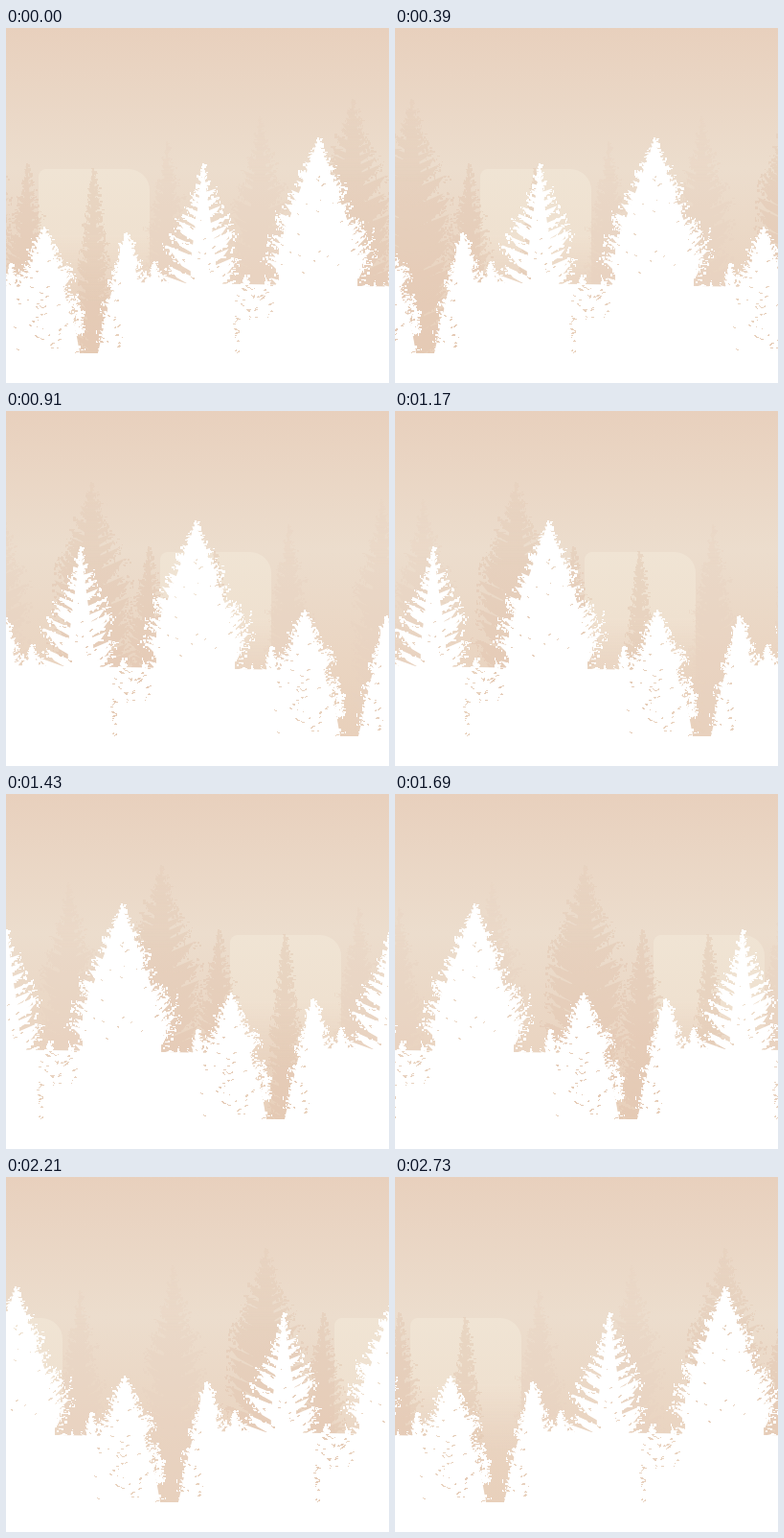
An HTML page with a canvas that plays this animation: 400x370 px, repeating every 2.86 s.

```html
<!DOCTYPE html>
<html lang="en">
<head>
<meta charset="utf-8">
<title>Forest</title>
<style>
html, body { margin: 0; width: 100%; height: 100%; overflow: hidden; background: #fff; }
canvas { display: block; }
</style>
</head>
<body>
<canvas id="stage" width="400" height="370"></canvas>
<script>
const W = 400, H = 370, GROUND = 339, STEP = 130, STEPS = 22;
const ctx = document.getElementById('stage').getContext('2d');

let seed = 7;
function rnd() {
  seed = (seed * 16807) % 2147483647;
  return seed / 2147483647;
}
const between = (a, b) => a + (b - a) * rnd();

function makeTile(paint) {
  const c = document.createElement('canvas');
  c.width = W;
  c.height = H;
  const g = c.getContext('2d');
  g.beginPath();
  g.rect(0, 0, W, GROUND);
  g.clip();
  paint(g);
  return c;
}

// Shapes repeat sideways so that each tile is seamless.
function poly(g, pts) {
  for (const dx of [-W, 0, W]) {
    g.beginPath();
    pts.forEach(([x, y]) => g.lineTo(x + dx, y));
    g.fill();
  }
}

function dab(g, x, y, w, h) {
  for (const dx of [-W, 0, W]) g.fillRect(Math.round(x) + dx, Math.round(y), w, h);
}

const grain = () => 1 + Math.floor(rnd() * 2.6);

// A bough rises outward from the trunk, with loose needles around it.
function bough(g, x, y, side, reach) {
  const drop = Math.min(20, reach * 0.5), t = 1.5 + reach * 0.06;
  poly(g, [[x, y + drop - t], [x + side * reach * 0.92, y],
    [x + side * reach * 0.7, y + drop * 0.4 + t], [x, y + drop + t * 2]]);
  for (let i = 0; i < 3 + reach * 0.55; i++) {
    const u = between(0.25, 1.05);
    dab(g, x + side * reach * u, y + drop * (1 - u) + between(-3, 5), grain(), grain());
  }
}

// The crown widens to w over the height h, then drops straight to the ground.
function tree(g, { x, y, h, w, bend = 1, core = 0.5, gap = 5, base = GROUND }) {
  const reach = d => 1 + w * Math.min(1, d / h) ** bend;
  const edge = [];
  for (let d = 0; d <= base - y; d += 8) {
    const r = reach(d) * core;
    edge.unshift([x - r, y + d + 5]);
    edge.push([x + r, y + d + 5]);
  }
  poly(g, edge);
  dab(g, x - 1, y, 2, 9);
  for (const side of [-1, 1]) {
    for (let d = 3; d < base - y; d += gap * between(0.6, 1.4)) {
      bough(g, x, y + d, side, reach(d) * between(0.7, 1.1));
    }
  }
}

// Short slanted slits cut through the snow.
function slits(g, x, y, rx, ry, n) {
  g.globalCompositeOperation = 'destination-out';
  for (let i = 0; i < n; i++) {
    const px = x + between(-rx, rx), py = y + between(-ry, ry);
    const lean = px < x ? 1 : -1;
    for (let k = 0; k < grain(); k++) dab(g, px + k * lean, py + k, grain(), 1);
  }
  g.globalCompositeOperation = 'source-over';
}

const front = makeTile(g => {
  g.fillStyle = '#fff';
  poly(g, [[96, GROUND], [110, 276], [130, 265], [425, 270], [470, 300], [477, GROUND]]);
  tree(g, { x: 326, y: 114, h: 110, w: 56, core: 0.72 });
  tree(g, { x: 206, y: 141, h: 97, w: 43, core: 0.3, gap: 8 });
  tree(g, { x: 126, y: 213, h: 100, w: 28, bend: 0.6, core: 0.6 });
  tree(g, { x: 40, y: 207, h: 70, w: 37, bend: 0.8, core: 0.6 });
  for (const [x, y, w] of [[155, 243, 14], [76, 289, 6], [250, 257, 13], [272, 262, 10], [405, 245, 11]]) {
    tree(g, { x, y, h: 24, w, base: y + 26, gap: 4 });
  }
  slits(g, 326, 200, 42, 55, 30);
  slits(g, 206, 220, 28, 40, 24);
  slits(g, 40, 285, 38, 52, 65);
  slits(g, 258, 285, 20, 18, 36);
  slits(g, 239, 318, 4, 18, 14);
  slits(g, 108, 300, 14, 36, 20);
});

const woods = makeTile(g => {
  const grow = (color, spec) => {
    g.fillStyle = color;
    tree(g, { core: 0.3, gap: 6, ...spec });
  };
  const pale = '#e8d2c0', deep = '#dfc2ab';
  grow(pale, { x: 168, y: 118, h: 110, w: 28 });
  grow(pale, { x: 265, y: 92, h: 90, w: 30 });
  grow(deep, { x: 362, y: 74, h: 100, w: 42, bend: 0.9 });
  grow(deep, { x: 22, y: 141, h: 80, w: 22 });
  grow(deep, { x: 91, y: 146, h: 100, w: 16, bend: 0.8, gap: 5 });
  // Tips dissolve into the haze.
  g.globalCompositeOperation = 'destination-in';
  const fade = g.createLinearGradient(0, 70, 0, 160);
  fade.addColorStop(0, 'rgba(0,0,0,.4)');
  fade.addColorStop(1, '#000');
  g.fillStyle = fade;
  g.fillRect(0, 0, W, H);
});

const back = makeTile(g => {
  const glow = g.createLinearGradient(0, 147, 0, 285);
  glow.addColorStop(0, '#f0e4d4');
  glow.addColorStop(0.5, '#efe1d0');
  glow.addColorStop(1, 'rgba(236,217,200,0)');
  g.fillStyle = glow;
  g.beginPath();
  g.roundRect(34, 147, 116, 150, [8, 22, 0, 0]);
  g.fill();
  g.globalAlpha = 0.42;
  g.drawImage(woods, 0, 0);
});

const sky = ctx.createLinearGradient(0, 0, 0, GROUND);
sky.addColorStop(0, '#e8d0bd');
sky.addColorStop(0.43, '#ecddcd');
sky.addColorStop(0.75, '#ead5c2');
sky.addColorStop(1, '#e8d0bb');

function scroll(tile, shift) {
  const x = ((Math.round(shift) % W) + W) % W;
  ctx.drawImage(tile, x, 0);
  ctx.drawImage(tile, x - W, 0);
}

function draw(now) {
  const u = Math.floor(now / STEP) % STEPS / STEPS;
  // The near trees run slightly ahead past the middle of the loop.
  const lead = 8 * Math.sin(Math.PI * u ** 1.8) ** 2;
  ctx.fillStyle = '#fff';
  ctx.fillRect(0, 0, W, H);
  ctx.fillStyle = sky;
  ctx.fillRect(0, 0, W, GROUND);
  scroll(back, u * W);
  scroll(front, -u * W - lead);
}

const start = performance.now();
function loop() {
  draw(performance.now() - start);
  requestAnimationFrame(loop);
}
loop();
</script>
</body>
</html>
```
